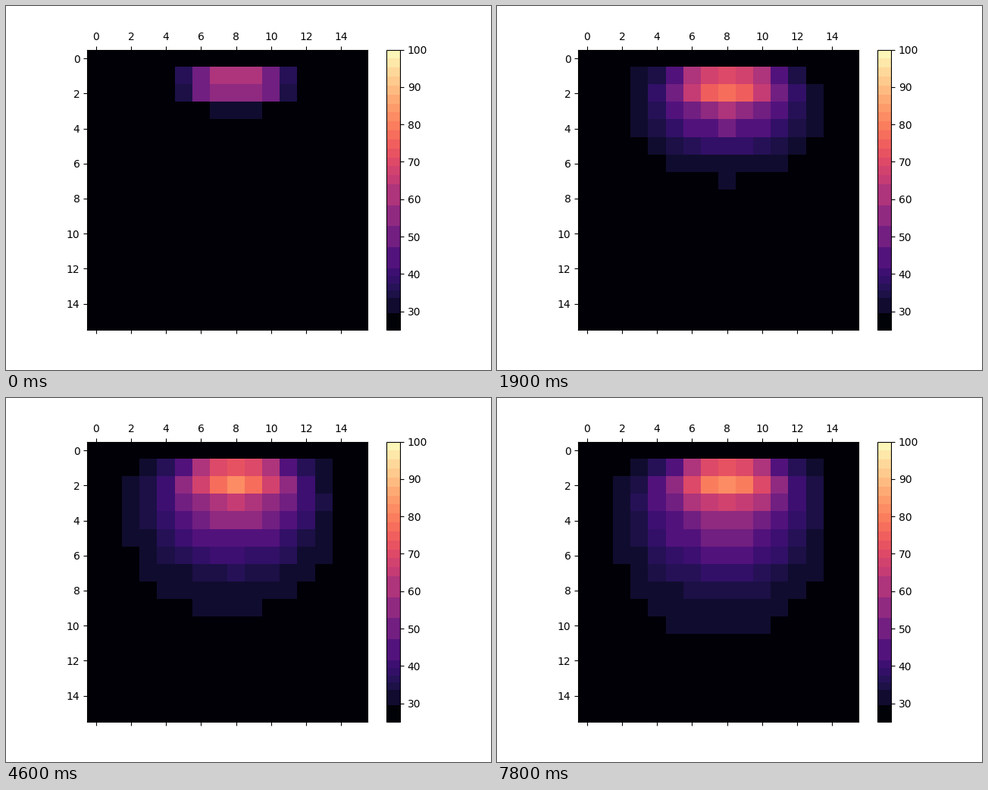
Animation, 640 px wide and 480 px high, one loop 8 s. Source, as a matplotlib script:

```python
import matplotlib.pyplot as plt
import numpy as np
from matplotlib.animation import FuncAnimation
from matplotlib.colors import ListedColormap

FRAMES, INTERVAL = 80, 100
SIZE, CENTER, REACH = 16, 8, 3
COLD, HOT = 25, 100
RATE = 0.3         # diffusion per frame, in cells squared
SUBSTEPS = 4
WARM_UP = 2        # frames of heating before the first picture


def banded_magma(n=750):
    """Magma in flat bands: fine at both ends, coarse in the middle."""
    edges = np.r_[COLD, 29.5, np.arange(33.5, 41.5, 2),
                  np.linspace(41.5, 64, 4, endpoint=False),
                  np.linspace(64, HOT, 16)]
    mids = (edges[:-1] + edges[1:]) / 2
    mids[0] = COLD + 1
    colors = plt.get_cmap("magma")((mids - COLD) / (HOT - COLD))
    temps = COLD + (np.arange(n) + 0.5) * (HOT - COLD) / n
    return ListedColormap(colors[np.searchsorted(edges, temps) - 1])


def bump(peaks, widths):
    """Parabolic heat profile across the columns, one row per peak."""
    offset = np.arange(-REACH, REACH + 1)
    return np.outer(peaks, np.ones(offset.size)) * (
        1 - np.divide.outer(offset, widths).T ** 2)


EARLY = bump([37, 32], [3.65, 3.65])
LATE = bump([48, 58.2], [4.1, 4.25])


def patch(t):
    """Temperature of the heated cells at time t, in frames."""
    if t < 0:
        return COLD + EARLY * (1 + t / WARM_UP)
    rise = 1 - 0.67 * np.exp(-t / 5) - 0.33 * np.exp(-t / 30)
    return COLD + EARLY + (LATE - EARLY) * rise


def diffuse(grid, rate):
    """One explicit heat step; the border stays cold."""
    inner = grid[1:-1, 1:-1]
    around = grid[:-2, 1:-1] + grid[2:, 1:-1] + grid[1:-1, :-2] + grid[1:-1, 2:]
    out = grid.copy()
    out[1:-1, 1:-1] = inner + rate * (around - 4 * inner)
    return out


def simulate():
    grid = np.full((SIZE, SIZE), float(COLD))
    states = []
    for step in range(-WARM_UP * SUBSTEPS, (FRAMES - 1) * SUBSTEPS + 1):
        grid = diffuse(grid, RATE / SUBSTEPS)
        grid[1:3, CENTER - REACH:CENTER + REACH + 1] = patch(step / SUBSTEPS)
        if step >= 0 and step % SUBSTEPS == 0:
            states.append(grid.copy())
    return states


states = simulate()

fig, ax = plt.subplots(figsize=(6.4, 4.8), dpi=100)
image = ax.matshow(states[0], cmap=banded_magma(), vmin=COLD, vmax=HOT)
fig.colorbar(image, ax=ax, ticks=range(30, 101, 10))


def update(i):
    image.set_data(states[i])
    return [image]


anim = FuncAnimation(fig, update, frames=FRAMES, interval=INTERVAL,
                     repeat=True, repeat_delay=0)
plt.show()
```
